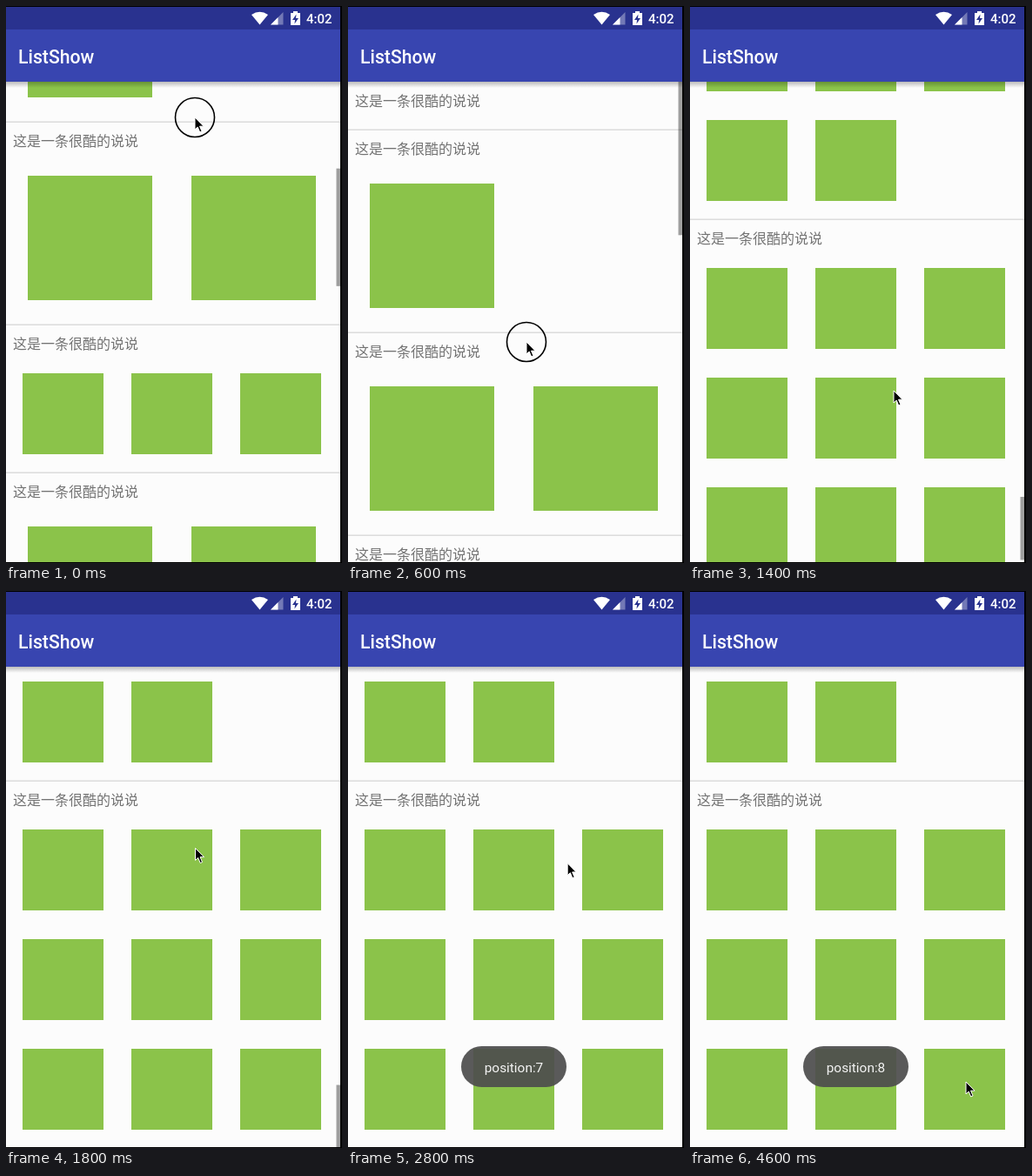
Recreate the animation shown at these times as an HTML page with a canvas. Size 386 by 640 pixels, loop 4800 ms.

```html
<!DOCTYPE html>
<html lang="zh-CN">
<head>
<meta charset="utf-8">
<title>ListShow</title>
<style>
html, body { margin: 0; width: 100%; height: 100%; overflow: hidden; background: #000; }
canvas { display: block; }
</style>
</head>
<body>
<canvas id="stage" width="386" height="640"></canvas>
<script>
const ctx = document.getElementById('stage').getContext('2d');
const LOOP = 4800, STEP = 200;
const TOP = 87, VIEW = 553, WIDTH = 384;
const FLING = 600, FIRST_TAP = 2400, SECOND_TAP = 3600, TOAST_TIME = 2000;

// The list: item n holds n pictures.
const items = [];
let listEnd = 0;
for (let n = 0; n < 10; n++) {
  const big = n === 1 || n === 2 || n === 4;
  const cols = big ? 2 : 3;
  const cell = big ? 188 : 126;
  const height = n ? Math.ceil(n / cols) * cell + (big ? 45 : 44) : 55;
  items.push({ n, big, cols, cell, height, y: listEnd });
  listEnd += height;
}

// Dragged down to the top, then flung to the end of the list.
function scrollAt(t) {
  if (t < FLING) return Math.max(0, 242 - 1.12 * t);
  return (listEnd - VIEW) * (1 - Math.exp(-0.957 * ((t - FLING) / 400) ** 2.23));
}

// Places where the pointer turns: time, x, y
const turns = [
  [0, 217, 128], [400, 210, 586], [600, 205, 386], [1000, 240, 386],
  [1400, 234, 442], [2200, 201, 149], [3600, 331, 565], [4600, 317, 564]
];

function pointerAt(t) {
  const i = Math.max(1, turns.findIndex(turn => turn[0] >= t));
  const [t0, x0, y0] = turns[i - 1], [t1, x1, y1] = turns[i];
  const u = (t - t0) / (t1 - t0);
  const eased = u * u * (3 - 2 * u);
  return [x0 + (x1 - x0) * eased, y0 + (y1 - y0) * eased];
}

function rect(x, y, w, h, color) {
  ctx.fillStyle = color;
  ctx.fillRect(x, y, w, h);
}

function text(str, x, y, font, color, align = 'left') {
  ctx.font = font;
  ctx.fillStyle = color;
  ctx.textAlign = align;
  ctx.fillText(str, x, y);
}

function shape(points, color) {
  ctx.beginPath();
  points.forEach(p => ctx.lineTo(...p));
  ctx.closePath();
  ctx.fillStyle = color;
  ctx.fill();
}

function circle(x, y, r) {
  ctx.beginPath();
  ctx.arc(x, y, r, 0, Math.PI * 2);
}

function drawItem(item, y) {
  if (item.n) rect(0, y - 0.5, WIDTH, 1.5, '#dcdcdc');
  text('这是一条很酷的说说', 8, y + 28,
    '16px "Noto Sans CJK SC", "Noto Sans CJK JP", sans-serif', '#737373');
  const size = item.big ? 143 : 93;
  const left = item.big ? 25 : 19;
  const top = item.big ? 62 : 56;
  const pitch = item.big ? 188 : 125;
  for (let i = 0; i < item.n; i++) {
    const col = i % item.cols, row = Math.floor(i / item.cols);
    rect(left + col * pitch, y + top + row * item.cell, size, size, '#8bc34a');
  }
}

function drawRipple(x, y) {
  circle(x, y, 51);
  ctx.fillStyle = '#f0f0f0';
  ctx.fill();
}

// The bar measures items rather than pixels, so its length varies.
function drawScrollbar(scroll) {
  const position = y => {
    const item = items.find(it => y < it.y + it.height);
    return item ? item.n + (y - item.y) / item.height : items.length;
  };
  const a = position(scroll), b = position(scroll + VIEW);
  rect(379.5, TOP + a * VIEW / 10, 4.5, (b - a) * VIEW / 10, 'rgba(0,0,0,.37)');
}

function drawBars() {
  const shade = ctx.createLinearGradient(0, TOP, 0, TOP + 7);
  shade.addColorStop(0, 'rgba(0,0,0,.26)');
  shade.addColorStop(1, 'rgba(0,0,0,0)');
  rect(0, TOP, WIDTH, 7, shade);
  rect(0, 0, WIDTH, 27, '#29328f');
  rect(0, 27, WIDTH, 60, '#3845b0');
  text('ListShow', 14, 66, '500 21.2px Roboto, sans-serif', '#fff');

  // Wi-Fi, signal, battery, clock
  ctx.beginPath();
  ctx.moveTo(291.5, 21.5);
  ctx.lineTo(282, 10);
  ctx.quadraticCurveTo(291.5, 3.5, 301, 10);
  ctx.fillStyle = '#fff';
  ctx.fill();
  shape([[304, 21.5], [318.5, 7], [318.5, 21.5]], 'rgba(255,255,255,.35)');
  shape([[304, 21.5], [312.5, 13], [312.5, 21.5]], '#fff');
  rect(327, 8, 11, 14, '#fff');
  rect(330, 6, 5, 2, '#fff');
  shape([[333.5, 9.5], [329, 16], [332, 16], [331.5, 20.5], [336, 14], [333, 14]], '#29328f');
  text('4:02', 345, 20, '500 15px Roboto, sans-serif', '#fff');
}

// Toasts queue up: each one waits for the last to go.
function drawToast(t) {
  const age = t - FIRST_TAP;
  if (age < 0) return;
  ctx.globalAlpha = Math.min(1, (age % TOAST_TIME + 100) / 200);
  ctx.beginPath();
  ctx.roundRect(130, 523, 121, 47, 23.5);
  ctx.fillStyle = 'rgba(78,78,78,.93)';
  ctx.fill();
  text('position:' + (7 + Math.floor(age / TOAST_TIME)), 190.5, 553,
    '15.4px Roboto, sans-serif', '#f4f4f4', 'center');
  ctx.globalAlpha = 1;
}

function drawPointer(x, y, down) {
  if (down) {
    circle(x, y, 22.5);
    ctx.strokeStyle = '#000';
    ctx.lineWidth = 1.6;
    ctx.stroke();
  }
  const arrow = [[0, 0], [0, 14], [3.2, 11], [5.7, 17], [8, 16], [5.5, 10.2], [10, 10.2]];
  shape(arrow.map(p => [x + p[0], y + p[1]]), '#000');
  ctx.strokeStyle = '#fff';
  ctx.lineWidth = 1;
  ctx.stroke();
}

function draw(t) {
  const scroll = Math.round(scrollAt(t));
  rect(0, 0, 386, 640, '#000');
  ctx.save();
  ctx.beginPath();
  ctx.rect(0, 1, WIDTH, 638);
  ctx.clip();
  rect(0, TOP, WIDTH, VIEW, '#fcfcfc');
  if (t === FIRST_TAP) drawRipple(190, 145);
  if (t === SECOND_TAP) drawRipple(314, 567);
  for (const item of items) {
    const y = TOP + item.y - scroll;
    if (y < 640 && y + item.height > TOP) drawItem(item, y);
  }
  if (t < 2200) drawScrollbar(scroll);
  drawBars();
  drawToast(t);
  ctx.restore();
  drawPointer(...pointerAt(t), t < 1000);
}

const began = performance.now();
function frame() {
  const t = (performance.now() - began) % LOOP;
  draw(Math.min(Math.floor(t / STEP) * STEP, LOOP - STEP));
  requestAnimationFrame(frame);
}
frame();
</script>
</body>
</html>
```
